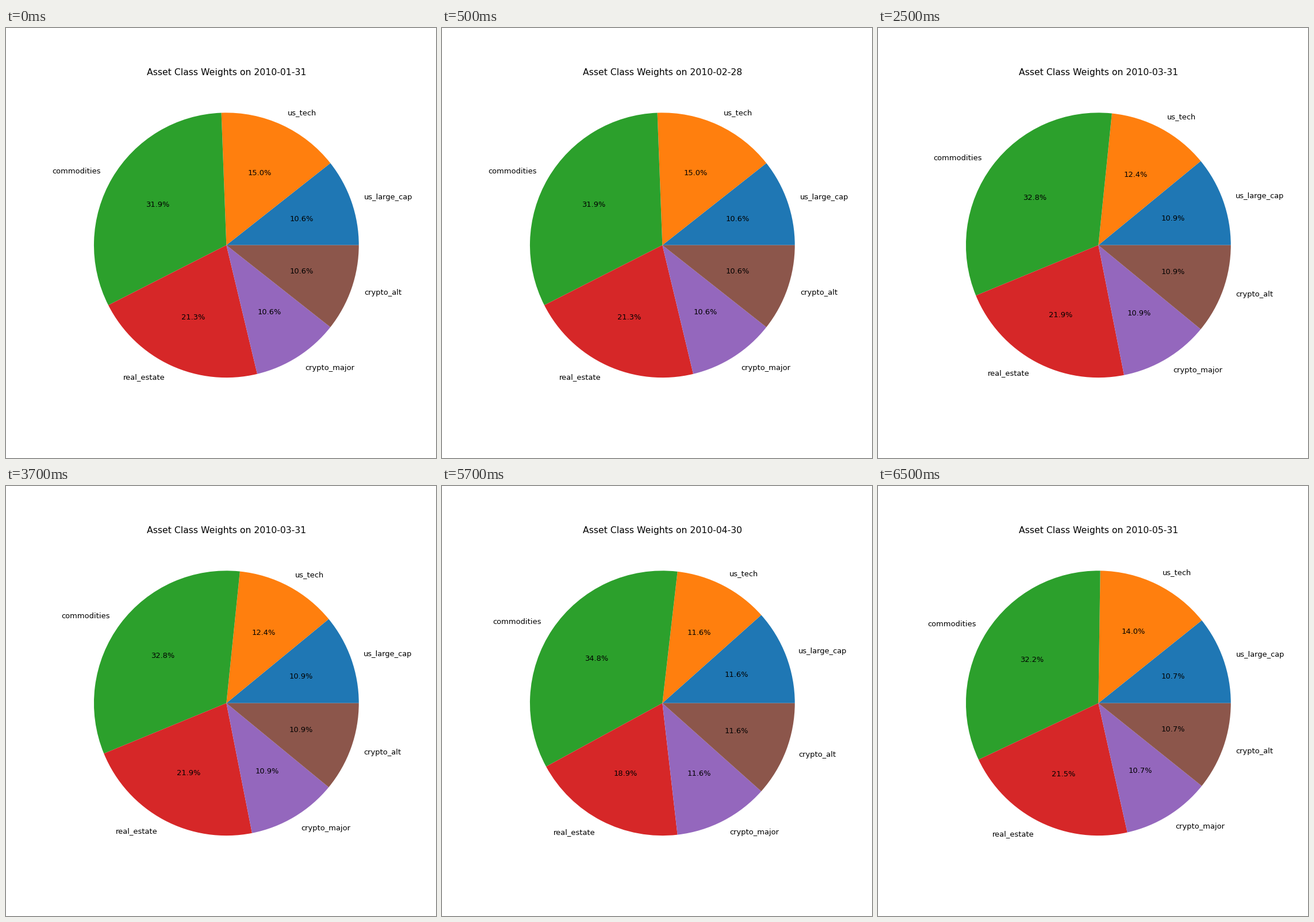
Write a matplotlib script that moves like this. It is 748 px wide and 748 px high and loops after 8000 ms.

```python
import matplotlib.pyplot as plt
from matplotlib.animation import FuncAnimation

FRAME_MS = 500
FRAMES = 16
FRAMES_PER_MONTH = 4
FIRST_MONTH_OFFSET = 3  # the loop starts near the end of January

LABELS = ["us_large_cap", "us_tech", "commodities",
          "real_estate", "crypto_major", "crypto_alt"]

# Date, base weight, and the asset that takes what the others leave.
MONTHS = [
    ("2010-01-31", 0.10628, "us_tech"),
    ("2010-02-28", 0.10628, "us_tech"),
    ("2010-03-31", 0.10947, "us_tech"),
    ("2010-04-30", 0.11590, "real_estate"),
    ("2010-05-31", 0.10747, "us_tech"),
]
MULTIPLES = {"commodities": 3, "real_estate": 2}

plt.rcParams["font.family"] = "DejaVu Sans"
fig, ax = plt.subplots(figsize=(8, 8), dpi=93.5)


def weights_for(base, remainder_asset):
    weights = {name: base * MULTIPLES.get(name, 1) for name in LABELS}
    weights[remainder_asset] = 0
    weights[remainder_asset] = 1 - sum(weights.values())
    return list(weights.values())


def update(frame):
    month = (frame + FIRST_MONTH_OFFSET) // FRAMES_PER_MONTH
    date, base, remainder_asset = MONTHS[month]
    ax.clear()
    ax.pie(weights_for(base, remainder_asset), labels=LABELS,
           autopct="%1.1f%%")
    ax.set_title(f"Asset Class Weights on {date}")


animation = FuncAnimation(fig, update, frames=FRAMES, interval=FRAME_MS,
                          repeat=True, repeat_delay=0)
plt.show()
```
